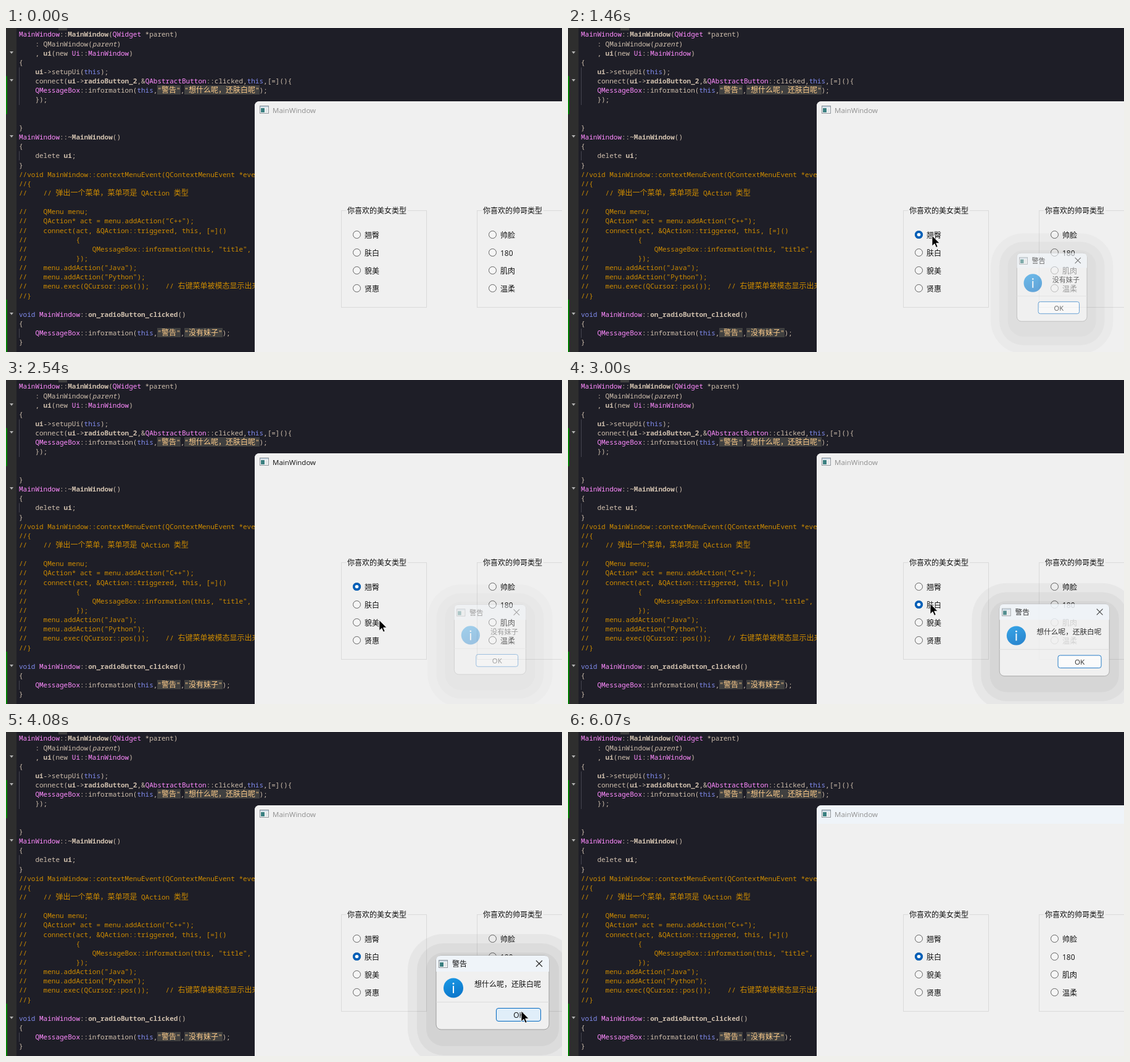
An HTML page for the animation above (6240 ms loop, 901 px wide and 526 px high).

```html
<!DOCTYPE html>
<html lang="zh">
<head>
<meta charset="utf-8">
<style>
html, body { margin: 0; width: 100%; height: 100%; overflow: hidden; background: #1e1e27; }
#code div {
  position: absolute; left: 21px; white-space: pre; color: #cfbfad;
  font: 11px/15px "Noto Sans Mono", "DejaVu Sans Mono", monospace;
}
#code .c { color: #cd8b00; }
#code .k { color: #808bed; }
#code .t { color: #ff8bff; }
#code .s { color: #ffcd8b; background: #404040; }
#code .b { font-weight: 700; }
#code .i { font-style: italic; }
#code .z { font: 12px/0 "Noto Sans CJK SC", sans-serif; }
svg { position: absolute; left: 0; top: 0; }
text { font: 12px "Open Sans", "Noto Sans CJK SC", sans-serif; fill: #111; }
.title { font-size: 11.5px; }
</style>
</head>
<body>
<div id="code"></div>
<svg id="stage" width="901" height="526"></svg>
<script>
const LOOP = 6240;
const $ = id => document.getElementById(id);

// x‹...› marks a run of class x
const lines = `t‹MainWindow›::b‹MainWindow›(t‹QWidget› *parent)
    : QMainWindow(i‹parent›)
    , b‹ui›(new t‹Ui›::t‹MainWindow›)
{
    b‹ui›->setupUi(k‹this›);
    connect(b‹ui›->b‹radioButton_2›,&t‹QAbstractButton›::clicked,k‹this›,[=](){
    t‹QMessageBox›::information(k‹this›,s‹"警告"›,s‹"想什么呢，还肤白呢"›);
    });


}
t‹MainWindow›::b‹~MainWindow›()
{
    delete b‹ui›;
}
//void MainWindow::contextMenuEvent(QContextMenuEvent *event)
//{
//    // 弹出一个菜单，菜单项是 QAction 类型

//    QMenu menu;
//    QAction* act = menu.addAction("C++");
//    connect(act, &QAction::triggered, this, [=]()
//            {
//                QMessageBox::information(this, "title", "text");
//            });
//    menu.addAction("Java");
//    menu.addAction("Python");
//    menu.exec(QCursor::pos());    // 右键菜单被模态显示出来
//}

k‹void› t‹MainWindow›::b‹on_radioButton_clicked›()
{
    t‹QMessageBox›::information(k‹this›,s‹"警告"›,s‹"没有妹子"›);
}`.split('\n');

$('code').innerHTML = lines.map((line, i) => {
  const html = line.replace(/&/g, '&amp;')
    .replace(/[\u3000-\uffef]+/g, '<span class=z>$&</span>')
    .replace(/(\w)‹(.*?)›/g, '<span class=$1>$2</span>');
  const kind = line.startsWith('//') ? 'c' : '';
  return `<div class="${kind}" style="top:${Math.round(2.4 + 15.15 * i)}px">${html}</div>`;
}).join('');

const rect = (x, y, w, h, fill, more = '') =>
  `<rect x="${x}" y="${y}" width="${w}" height="${h}" fill="${fill}" ${more}/>`;
const text = (x, y, s, more = '') => `<text x="${x}" y="${y}" ${more}>${s}</text>`;

const appIcon = (x, y) =>
  rect(x + .5, y + .5, 14, 12, '#fafafa', 'stroke="#8d949a"') +
  rect(x + 1, y + 1, 13, 2, '#c3d3e0') +
  rect(x + 2, y + 4, 6, 7, '#3a7f80') +
  rect(x + 9, y + 4, 4, 7, '#e3e7e9');

const group = (x, title, options, id) =>
  rect(x + .5, 296.5, 138, 157, 'none', 'stroke="#dadada"') +
  rect(x + 8, 290, 100, 13, '#f0f0f0') +
  text(x + 10, 301, title) +
  options.map((label, i) => {
    const at = `cx="${x + 25.5}" cy="${335.5 + 29 * i}"`;
    return `<circle ${at} r="6" fill="#f5f5f5" stroke="#626262"/>
      <g id="${id}${i}" visibility="hidden"><circle ${at} r="6.6" fill="#005fb8"/><circle ${at} r="2.8" fill="#fff"/></g>` +
      text(x + 38, 341 + 29 * i, label);
  }).join('');

// stepped shadow, reaching further down than up
const shadow = (x, y, w, h) => [46, 31, 16].map(d =>
  rect(x - d, y - d + 11, w + 2 * d, h + 2 * d, '#000', `rx="${d + 12}" opacity=".045"`)).join('');

const dialog = (id, x, w, message) => `<g id="${id}">
  ${shadow(x, 363, w, 120)}
  ${rect(x, 363, w, 120, '#f0f0f0', 'rx="8" stroke="#8f8f8f" stroke-width=".8"')}
  <path d="M${x} 389V371q0-8 8-8h${w - 16}q8 0 8 8v18z" fill="#eff4f9"/>
  ${rect(x, 438, w, 1, '#dcdcdc')}
  ${appIcon(x + 4, 370)}
  ${text(x + 26, 381, '警告')}
  <path d="M${x + w - 21} 371l10 10m0-10l-10 10" stroke="#222" stroke-width="1.1"/>
  <circle cx="${x + 28}" cy="415.5" r="16" fill="url(#blue)"/>
  <circle cx="${x + 28}" cy="408.5" r="1.4" fill="#fff"/>
  <path d="M${x + 28} 412v12" stroke="#fff" stroke-width="2"/>
  ${text(x + 62, 414, message)}
  ${rect(x + w - 85.5, 448.5, 72, 21, '#fdfdfd', `id="${id}Ok" rx="3.5" stroke="#0067c0"`)}
  ${text(x + w - 49.5, 464, 'OK', 'text-anchor="middle"')}
</g>`;

const foldMarks = [39, 84, 175, 463].map(y => `M6 ${y - 1}h6l-3 4z`).join('');

$('stage').innerHTML = `
<linearGradient id="blue" x2=".4" y2="1"><stop stop-color="#1b9ae6"/><stop offset="1" stop-color="#0c78cc"/></linearGradient>
${rect(0, 0, 17, 526, '#2e2e2e')}
${rect(0, 78, 2, 62, '#008000')}${rect(0, 441, 2, 85, '#008000')}
${rect(85, 0, 14, 4, '#404040')}
<path d="${foldMarks}" fill="#b0b0b0"/>
<path d="M21.5 64v61M21.5 200v15M21.5 488v15" stroke="#44444e"/>
${rect(403, 119, 520, 430, '#f0f0f0', 'rx="8"')}
<path id="bar" d="M403 149V127q0-8 8-8h490v30z"/>
${appIcon(411, 126)}
${text(432, 138, 'MainWindow', 'id="caption" class="title"')}
${group(543, '你喜欢的美女类型', ['翘臀', '肤白', '貌美', '贤惠'], 'left')}
${group(763, '你喜欢的帅哥类型', ['帅脸', '180', '肌肉', '温柔'], 'right')}
${dialog('first', 723.5, 123, '没有妹子')}
${dialog('second', 697, 183, '想什么呢，还肤白呢')}
<path id="cursor" d="M0 0V17L4 13.2L6.6 19.3L9.2 18.2L6.6 12.3H12Z" fill="#000" stroke="#fff" stroke-width=".8"/>`;

const dialogs = [
  { id: 'first', pivot: 775, right: 846.5, open: 1400, close: 2440 },
  { id: 'second', pivot: 778, right: 880, open: 2900, close: 4600 },
];
const FADE = 160;
const PIVOT_Y = 395;

// time, x, y
const path = [
  [430, 527, 505], [700, 575, 400], [850, 597, 345], [950, 590, 337],
  [1480, 590, 337], [1700, 740, 420], [1880, 800, 450], [2420, 798, 455],
  [2540, 605, 390], [2680, 587, 363], [3280, 587, 363], [3330, 625, 370],
  [3500, 760, 415], [3800, 840, 448], [3950, 840, 448], [4080, 835, 453],
  [4370, 836, 458], [4970, 836, 458], [5210, 804, 499], [5350, 804, 527],
];

const clamp = v => Math.max(0, Math.min(1, v));

function cursorAt(t) {
  const n = path.findIndex(p => p[0] > t);
  if (n < 1) return null;
  const [a, b] = [path[n - 1], path[n]];
  const k = (t - a[0]) / (b[0] - a[0]);
  return [1, 2].map(i => a[i] + (b[i] - a[i]) * k);
}

function show(id, on) {
  $(id).setAttribute('visibility', on ? 'visible' : 'hidden');
}

function draw(t) {
  const cursor = cursorAt(t);
  show('cursor', cursor);
  if (cursor) $('cursor').setAttribute('transform', `translate(${cursor})`);

  for (const { id, pivot, right, open, close } of dialogs) {
    const grow = 1 - (1 - clamp((t - open) / FADE)) ** 2;
    const left = 1 - clamp((t - close) / FADE);
    const alpha = t < close ? grow : left;
    const scale = t < close ? .8 + .2 * grow : .91 + .09 * left;
    const node = $(id);
    show(id, alpha > 0);
    node.setAttribute('opacity', alpha);
    node.setAttribute('transform',
      `translate(${pivot} ${PIVOT_Y}) scale(${scale}) translate(${-pivot} ${-PIVOT_Y})`);
    const hover = cursor && cursor[0] > right - 86 && cursor[0] < right - 13 && cursor[1] > 447 && cursor[1] < 470;
    $(id + 'Ok').setAttribute('fill', hover ? '#e0eef9' : '#fdfdfd');
  }

  const modal = dialogs.some(d => t >= d.open && t < d.close);
  const active = t >= 1270 && t < 6070 && !modal;
  $('caption').style.fill = active ? '#111' : '#8e8e8e';
  $('bar').setAttribute('fill', t >= 6070 ? '#eff4f9' : '#f0f0f0');
  show('left0', t >= 1380 && t < 2850);
  show('left1', t >= 2850);
}

const start = performance.now();
function tick() {
  draw((performance.now() - start) % LOOP);
  requestAnimationFrame(tick);
}
tick();
</script>
</body>
</html>
```
